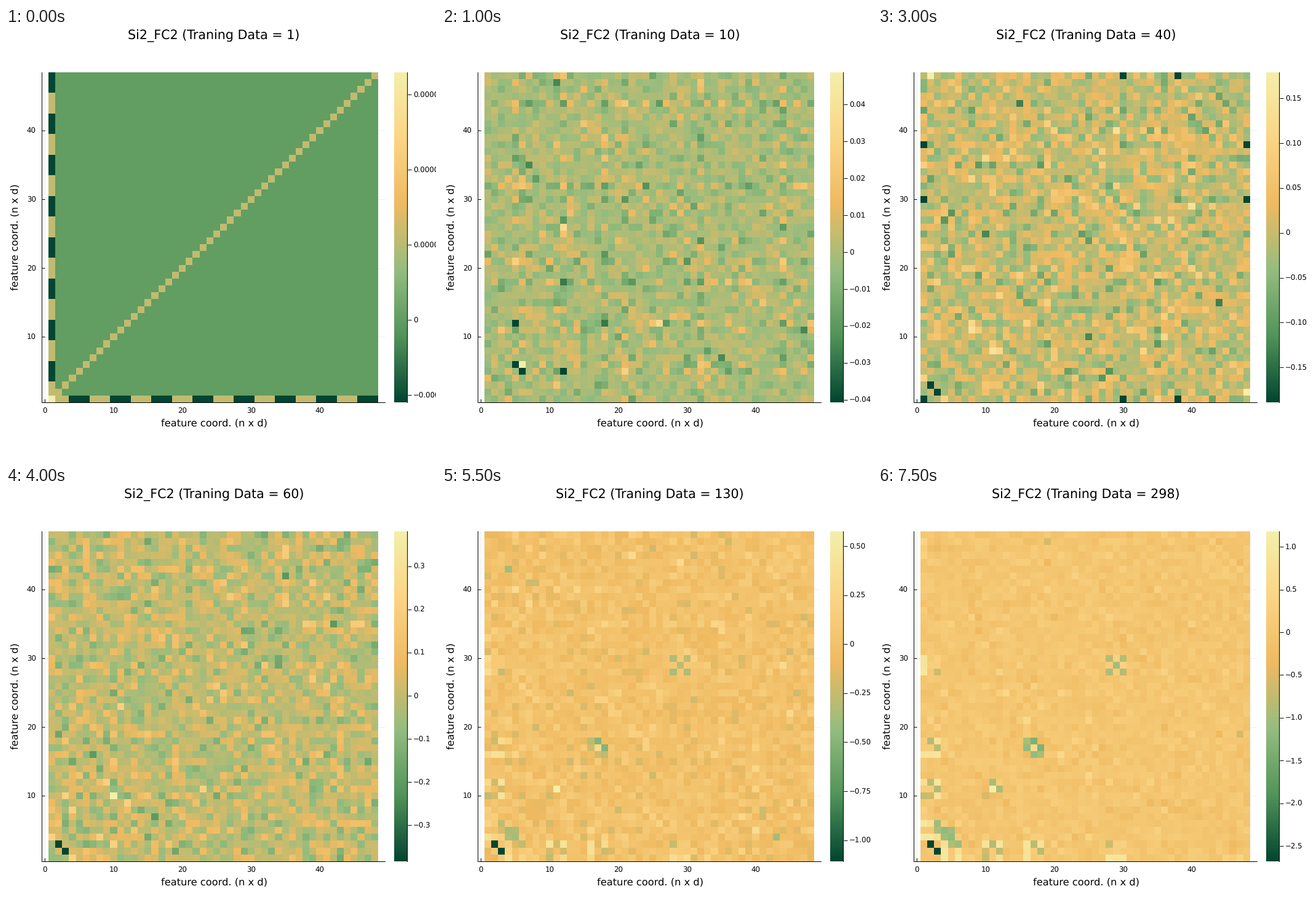
Recreate the animation shown at these times as a matplotlib script. Size 699 px wide and 700 px high, loop 8 s.

```python
import math
import numpy as np
import matplotlib.pyplot as plt
from matplotlib.animation import FuncAnimation
from matplotlib.collections import LineCollection
from matplotlib.colors import LinearSegmentedColormap

WIDTH, HEIGHT, DPI = 699, 700, 64
SIZE = 48
UNIT = 536 / SIZE
LEFT, RIGHT, TOP, BOTTOM = 58.5, 617, 72, 608
HEAT_LEFT, HEAT_RIGHT = 69, 605
BAR_LEFT, BAR_RIGHT, BAR_AXIS = 631, 652, 652.5
TICK_PX, LABEL_PX, TITLE_PX = (1.475 * pt for pt in (8, 11, 14))

STOPS = [(2, 69, 49), (82, 147, 89), (148, 189, 128),
         (239, 186, 97), (251, 213, 133), (244, 239, 170)]
CMAP = LinearSegmentedColormap.from_list("forest", np.array(STOPS) / 255, N=512)

COUNTS = [1, 5, *range(10, 21, 5), *range(30, 71, 10),
          100, 130, 160, 200, 250, 298]

# Colour limits at a few counts; they grow geometrically in between.
KNOTS = [1, 5, 10, 20, 40, 60, 130, 298]
LOWS = [2.746e-5, .036, .0407, .0868, .189, .384, 1.108, 2.68]
HIGHS = [8.238e-5, .042, .0487, .1155, .179, .381, .576, 1.182]

# From this count on: the darkest entries and the lightest one.
PHASES = [
    (5, [(5, 12), (5, 6)], (6, 6)),
    (15, [(28, 33)], (33, 33)),
    (30, [(2, 3), (1, 1), (1, 30), (1, 38), (30, 48), (38, 48)], (2, 48)),
    (50, [(2, 3)], (10, 10)),
    (100, [(2, 3)], (11, 11)),
]
LIVELY = (5, 6, 11, 12, 18, 21, 32, 44)
BONDED_ATOMS = (1, 3, 5, 9)


def grow(count, values):
    return math.exp(np.interp(math.log(count), np.log(KNOTS), np.log(values)))


def limits(count):
    return -grow(count, LOWS), grow(count, HIGHS)


def noise_share(count):
    return np.interp(math.log(count), np.log([5, 40, 130, 298]),
                     [.072, .095, .05, .032])


def mirror(m):
    return np.triu(m) + np.triu(m, 1).T


def single_sample():
    """Unit diagonal, with a first row alternating in blocks of three."""
    m = np.eye(SIZE)
    signs = np.where(np.arange(SIZE) // 3 % 2, -1, 1)
    m[0], m[:, 0] = signs, signs
    m[0, 0] = 3
    return m


def bond_blocks(rng):
    """3 x 3 couplings of the bonded atoms with themselves and the first atom."""
    m = np.zeros((SIZE, SIZE))
    for atom in BONDED_ATOMS:
        cells = slice(3 * atom, 3 * atom + 3)
        m[:3, cells] = rng.choice([-.3, .1, .7], (3, 3))
        m[cells, cells] = rng.choice([-.35, -.1, .2], (3, 3))
    m[16, 15:18] = m[15:18, 16] = -.5, .6, -.5
    return mirror(m)


def build_matrices():
    rng = np.random.default_rng(7)
    blocks = bond_blocks(rng)
    weight = np.full(SIZE, .9)
    weight[np.array(LIVELY) - 1] = 1.5
    drift = np.zeros((SIZE, SIZE))
    matrices = []
    for count in COUNTS:
        low, high = limits(count)
        if count == 1:
            matrices.append(single_sample() * -low)
            continue
        fresh = mirror(rng.standard_t(7, (SIZE, SIZE)) / 1.18)
        drift = .6 * drift + .8 * fresh
        noise = drift * np.outer(weight, weight) if count < 15 else drift
        m = noise * noise_share(count) * (high - low)
        strength = np.clip(math.log(count / 40) / math.log(5), 0, 1)
        m += strength * np.where(blocks > 0, blocks * high, -blocks * low)
        m = np.clip(m, .7 * low, .8 * high)
        _, darkest, lightest = [p for p in PHASES if p[0] <= count][-1]
        for i, j in darkest:
            m[i - 1, j - 1] = m[j - 1, i - 1] = low
        i, j = lightest
        m[i - 1, j - 1] = m[j - 1, i - 1] = high
        matrices.append(m)
    return matrices


def nice_ticks(low, high):
    """Tick values and decimals for the finest 1 / 2.5 / 5 step that fits."""
    power = math.floor(math.log10((high - low) / 9))
    base = next(b for b in (1, 2.5, 5, 10) if (high - low) / (b * 10**power) <= 9)
    step = base * 10**power
    decimals = -power + {2.5: 1, 10: -1}.get(base, 0)
    return step * np.arange(math.ceil(low / step), math.floor(high / step) + 1), decimals


def tick_label(value, decimals):
    if abs(value) < 1e-12:
        return "0"
    return f"{value:.{decimals}f}".replace("-", "\u2212")


def x_px(v):
    return HEAT_LEFT + UNIT * (v - .5)


def y_px(v):
    return BOTTOM - UNIT * (v - .5)


def points(px):
    return px * 72 / DPI


plt.rcParams["font.family"] = "DejaVu Sans"
plt.rcParams["text.hinting"] = "none"
fig = plt.figure(figsize=(WIDTH / DPI, HEIGHT / DPI), dpi=DPI, facecolor="white")
ax = fig.add_axes([0, 0, 1, 1])


def text(x, y, s, px, ha="center", **kw):
    return ax.text(x, y, s, fontsize=points(px), ha=ha, va="baseline", **kw)


def line(xs, ys, alpha=1, z=1, width=1):
    ax.plot(xs, ys, color="black", lw=points(width), alpha=alpha, zorder=z,
            solid_capstyle="butt", snap=False)


heat = ax.imshow(np.zeros((SIZE, SIZE)), cmap=CMAP, interpolation="nearest",
                 extent=(HEAT_LEFT, HEAT_RIGHT, BOTTOM, TOP),
                 aspect="auto", zorder=2)
ax.imshow(np.linspace(1, 0, 512)[:, None], cmap=CMAP, aspect="auto", zorder=2,
          extent=(BAR_LEFT, BAR_RIGHT, BOTTOM, TOP))
ax.set_xlim(0, WIDTH)
ax.set_ylim(HEIGHT, 0)
ax.axis("off")

line([LEFT, RIGHT], [BOTTOM + .5] * 2, z=3)
line([LEFT, LEFT], [TOP, BOTTOM + 1], z=3)
line([BAR_AXIS, BAR_AXIS], [TOP, BOTTOM + 1], z=3)
for v in range(0, 41, 10):
    x, y = x_px(v), y_px(v)
    line([x, x], [TOP, BOTTOM], alpha=.1, width=.6)
    line([x, x], [BOTTOM - 5, BOTTOM])
    text(x, 626, str(v), TICK_PX)
    if v:
        line([LEFT, RIGHT], [y, y], alpha=.1, width=.6)
        line([LEFT, LEFT + 5], [y, y])
        text(48.7, y + 4.4, str(v), TICK_PX, ha="right")

text(338, 647, "feature coord. (n x d)", LABEL_PX)
text(20, 340, "feature coord. (n x d)", LABEL_PX, rotation=90,
     rotation_mode="anchor")
title = text(338, 18, "", TITLE_PX)
bar_ticks = LineCollection([], colors="black", linewidths=points(1), zorder=3)
ax.add_collection(bar_ticks, autolim=False)
bar_labels = [text(662, 0, "", TICK_PX, ha="left") for _ in range(12)]

MATRICES = build_matrices()


def draw(k):
    low, high = limits(COUNTS[k])
    heat.set_data(MATRICES[k][::-1])
    heat.set_clim(low, high)
    title.set_text(f"Si2_FC2 (Traning Data = {COUNTS[k]})")
    ticks, decimals = nice_ticks(low, high)
    ys = BOTTOM - (ticks - low) / (high - low) * (BOTTOM - TOP)
    bar_ticks.set_segments([[(BAR_AXIS, y), (BAR_AXIS + 6, y)] for y in ys])
    for n, label in enumerate(bar_labels):
        shown = n < len(ticks)
        label.set_visible(shown)
        if shown:
            label.set_text(tick_label(ticks[n], decimals))
            label.set_y(ys[n] + 4.4)
    return [heat, title, bar_ticks, *bar_labels]


animation = FuncAnimation(fig, draw, frames=len(COUNTS), interval=500,
                          init_func=lambda: draw(0), repeat=True, repeat_delay=0)
plt.show()
```
